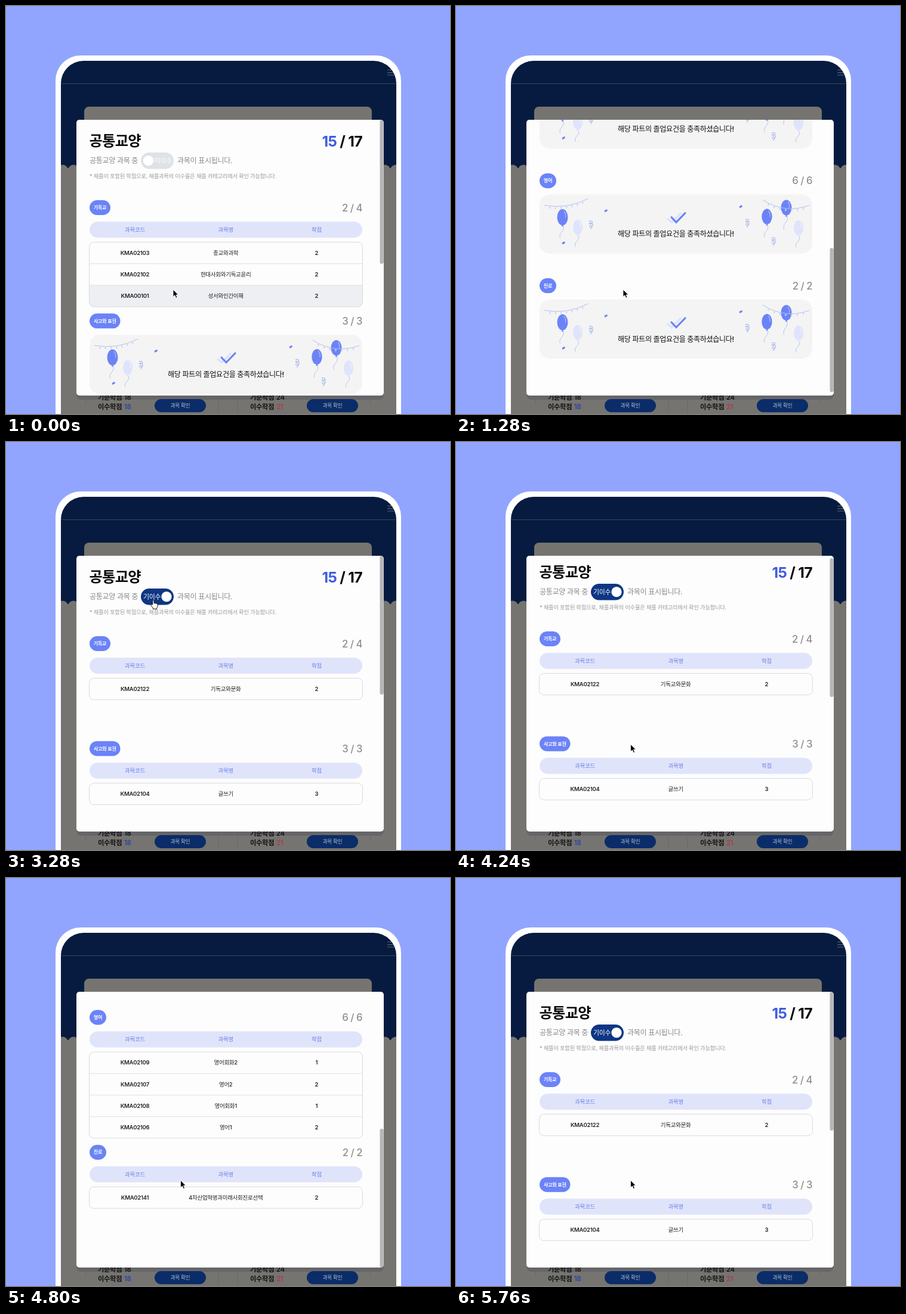
Animation, 744 px wide and 685 px high, one loop 6.24 s. Source, as an HTML page:

```html
<!DOCTYPE html>
<html lang="ko">
<head>
<meta charset="utf-8">
<title>공통교양</title>
<style>
html, body { margin: 0; width: 100%; height: 100%; overflow: hidden; background: #91a5ff; }
svg { display: block; }
text { font-family: Inter, "Noto Sans CJK KR", "Noto Sans CJK", sans-serif; letter-spacing: -.03em; white-space: pre; }
</style>
</head>
<body>
<svg id="stage" width="744" height="685" viewBox="0 0 744 685"></svg>
<script>
const LOOP = 6240, TOP = 191, VIEW = 463;
const BLUE = '#6b83f7', PALE = '#dfe4fc', LINE = '#b3bfee', NAVY = '#0d3684';

const rect = (x, y, w, h, r, fill, extra = '') =>
  `<rect x="${x}" y="${y}" width="${w}" height="${h}" rx="${r}" fill="${fill}" ${extra}/>`;
const circle = (x, y, r, fill) => `<circle cx="${x}" cy="${y}" r="${r}" fill="${fill}"/>`;
const path = (d, stroke, width = 1, extra = '') =>
  `<path d="${d}" fill="none" stroke="${stroke}" stroke-width="${width}" ${extra}/>`;
// Places text by the vertical middle of its glyphs.
const text = (s, x, cy, size, fill, weight = 500, anchor = 'start') =>
  `<text x="${x}" y="${cy + size * .36}" font-size="${size}" fill="${fill}" font-weight="${weight}" text-anchor="${anchor}">${s}</text>`;

// ---- page behind the dialog ----
function summary(x, needed, done, color) {
  return text('기준학점', x, 657, 11.3, '#111', 600) + text(needed, x + 44, 657, 11.3, '#111', 600) +
    text('이수학점', x, 673, 11.3, '#111', 600) + text(done, x + 44, 673, 11.3, color, 600) +
    rect(x + 95, 660, 86, 22, 11, '#0a2c68') +
    text('과목 확인', x + 138, 671, 8.6, '#b9c0ce', 500, 'middle');
}
function backdrop() {
  let s = rect(83, 83, 579, 700, 42, '#fff') + '<g clip-path="url(#screen)">' +
    rect(92, 92, 562, 600, 0, '#061b3f') + path('M92 130.5H654', '#3b465b');
  for (const y of [107.5, 111.8, 116]) s += path(`M639 ${y}H654`, '#5c6577', 1.2);
  s += rect(92, 272, 562, 420, 0, '#757470');
  for (let x = 95; x < 664; x += 18) s += circle(x, 275.5, 9, '#757470');
  s += rect(131, 169, 482, 120, 8, '#757470') +
    path('M133.5 650V669M356 650V685M388 650V685M610.5 650V669', '#686868') +
    rect(118, 600, 515, 61, 8, '#666669') +
    summary(154, 18, 18, '#2747a8') + summary(409, 24, 21, '#b03a4a');
  return s + '</g>';
}

// ---- celebration card ----
const balloon = (x, y, rx, ry, fill, drop) =>
  path(`M${x} ${y + ry}q4 ${drop * .25} -1 ${drop * .5}t-3 ${drop * .5}`, LINE, .9) +
  `<path d="M${x - 2} ${y + ry + 2}l2 -3 2 3z" fill="${fill}"/>` +
  `<ellipse cx="${x}" cy="${y}" rx="${rx}" ry="${ry}" fill="${fill}"/>` +
  path(`M${x + rx * .3} ${y - ry * .72}q${rx * .4} ${ry * .3} ${rx * .25} ${ry * .75}`, '#fff', 1.1, 'opacity=".5" stroke-linecap="round"');
const confetti = (x, y) => `<path d="M${x - 2.5} ${y}l4.5 -2.5 1 3 -4.5 2.5z" fill="${BLUE}"/>`;
const curl = (x, y) =>
  path(`M${x - 3} ${y - 6}c8 -3 7 5 1 4c-4 -2 7 -3 5 3c-1 4 -7 3 -5 0c3 -3 6 3 1 6`, '#92a6ef', 1);
function garland(x0, y0, cx, cy, x1, y1) {
  let s = path(`M${x0} ${y0}Q${cx} ${cy} ${x1} ${y1}`, LINE, 1);
  for (let i = 1; i < 8; i++) {
    const t = i / 8, u = 1 - t;
    const x = u * u * x0 + 2 * u * t * cx + t * t * x1, y = u * u * y0 + 2 * u * t * cy + t * t * y1;
    s += `<ellipse cx="${x}" cy="${y + 2.6}" rx="1.2" ry="2" fill="#cbd4fa"/>`;
  }
  return s;
}
function card(y) {
  return `<g transform="translate(140 ${y})">` + rect(0, 0, 457, 99, 17, '#f4f4f4') +
    balloon(38.5, 38, 9, 13.5, BLUE, 22) + balloon(64, 55, 8, 12.5, PALE, 20) +
    garland(8, 18, 46, 25, 81, 7) + confetti(111, 27) + confetti(40, 81) + curl(86, 51) +
    path('M214 40L221.5 46.5 237 31', '#dbe2fd', 3.2) +
    path('M221 38L229 46.5 244 31', BLUE, 3.2, 'stroke-linecap="round"') +
    text('해당 파트의 졸업요건을 충족하셨습니다!', 228.5, 66.5, 12.1, '#111', 500, 'middle') +
    confetti(337, 20) + curl(348, 48) + balloon(381, 37, 8.7, 13, BLUE, 22) +
    balloon(413.5, 22, 9, 13, BLUE, 24) + balloon(434, 56, 8.2, 12.5, PALE, 20) +
    garland(374, 9, 412, 33, 452, 18) + curl(392, 79) + '</g>';
}

// ---- scrolling content ----
const rowAreas = [];
const heading = (name, width, y, count) =>
  rect(140, y - 12.5, width, 25, 12.5, BLUE) + text(name, 140 + width / 2, y, 8.1, '#fff', 700, 'middle') +
  text(count, 597, y, 16.8, '#8f8f8f', 500, 'end');
const columns = (cells, y, fill, weight) =>
  cells.map((c, i) => text(c, 216 + i * 152.2, y, 9.5, fill, i === 1 ? 500 : weight, 'middle')).join('');
function table(y, rows) {
  const h = 36.2, top = y + 58;
  let s = rect(140, y + 23.5, 457, 27, 13.5, '#e0e4fb') +
    columns(['과목코드', '과목명', '학점'], y + 37, '#6c82e4', 500);
  rows.forEach((cells, i) => {
    const ry = top + i * h, first = i === 0, last = i === rows.length - 1;
    const a = first ? 8 : 0, b = last ? 8 : 0;
    s += `<path data-row="${ry}" d="M140 ${ry + a}q0 ${-a} ${a} ${-a}H${597 - a}q${a} 0 ${a} ${a}V${ry + h - b}q0 ${b} ${-b} ${b}H${140 + b}q${-b} 0 ${-b} ${-b}z" fill="#fdfdfd"/>`;
    if (!first) s += path(`M140 ${ry}H597`, '#dfe0e4');
    s += columns(cells, ry + 18, '#222', 600);
  });
  return s + rect(139.5, top, 458, rows.length * h, 8, 'none', 'stroke="#d9dade"');
}
const intro =
  text('공통교양', 139.5, 226.5, 24.3, '#0b0b0b', 700) +
  `<text x="597" y="235.5" font-size="24.8" font-weight="700" text-anchor="end" fill="#0b0b0b"><tspan fill="#3f5be3">15</tspan> / 17</text>` +
  text('공통교양 과목 중', 140, 259.5, 12.1, '#8a8a8a') + text('과목이 표시됩니다.', 287, 259.5, 12.1, '#8a8a8a') +
  text('* 채플이 포함된 학점으로, 채플과목의 이수율은 채플 카테고리에서 확인 가능합니다.', 140, 286, 9.35, '#9b9b9b', 400);

const pending = heading('기독교', 35, 338.5, '2 / 4') + table(338.5, [
    ['KMA02103', '종교와과학', 2], ['KMA02102', '현대사회와기독교윤리', 2], ['KMA00101', '성서와인간이해', 2]]) +
  heading('사고와 표현', 51.5, 528.8, '3 / 3') + card(552) +
  heading('영어', 28, 705.2, '6 / 6') + card(728.4) +
  heading('진로', 28, 881.4, '2 / 2') + card(904.8);

const finished = heading('기독교', 35, 338.5, '2 / 4') + table(338.5, [['KMA02122', '기독교와문화', 2]]) +
  heading('사고와 표현', 51.5, 514.7, '3 / 3') + table(514.7, [['KMA02104', '글쓰기', 3]]) +
  heading('영어', 28, 691, '6 / 6') + table(691, [
    ['KMA02109', '영어회화2', 1], ['KMA02107', '영어2', 2], ['KMA02108', '영어회화1', 1], ['KMA02106', '영어1', 2]]) +
  heading('진로', 28, 917.5, '2 / 2') + table(917.5, [['KMA02141', '4차산업혁명과미래사회진로선택', 2]]);

const toggle = rect(226, 246, 55, 27.5, 13.75, '#dfe1e8', 'id="track"') +
  `<g id="offLabel">${text('미이수', 249, 259.7, 10.9, '#fff')}</g>` +
  `<g id="onLabel">${text('기이수', 230, 259.7, 10.9, '#fff')}</g>` +
  '<circle id="knob" cy="259.7" r="8.6" fill="#fff"/>';

const arrow = '<path id="arrow" d="M0 0V12.3L2.9 9.7 4.9 14.2 7 13.2 5 8.9H8.8z" fill="#000" stroke="#fff" stroke-width=".9"/>';
const hand = '<path id="hand" d="M-1.3 7V.8q0-1.3 1.2-1.3t1.2 1.3V4.6q1.2-.8 2 .3 1.3-.7 2 .5 2-.4 2 1.5V9.5q0 2-1.5 3.2V14.2H-.6V12.8L-4.2 8.3q-.4-1.6 1.1-1.6z" fill="#fff" stroke="#111" stroke-width="1"/>';

stage.innerHTML = `<defs>
  <clipPath id="screen">${rect(92, 92, 562, 700, 38, '#000')}</clipPath>
  <clipPath id="dialog">${rect(118, TOP, 515, VIEW, 5, '#000')}</clipPath></defs>` +
  rect(0, 0, 744, 685, 0, '#91a5ff') + backdrop() +
  '<g clip-path="url(#dialog)">' + rect(118, TOP, 515, VIEW, 0, '#fdfdfd') +
  `<g id="content">${intro}${toggle}<g id="pending">${pending}</g><g id="finished">${finished}</g></g>` +
  rect(626.5, TOP, 6.2, 242, 3.1, '#b6b6b8', 'id="thumb"') + '</g>' +
  `<g id="cursor">${arrow}${hand}</g>`;

// ---- timelines: [time, values...], each held until the next ----
const run = (start, values) => values.map((v, i) => [start + i * 80].concat(v));
const scrolls = [[0, 0],
  ...run(160, [10, 45, 110, 180, 235, 280, 315, 338, 352, 360, 363]),
  ...run(1120, [373, 395, 411.8, 419, 422]), [1600, 423],
  ...run(1920, [350, 200]), ...run(2160, [85, 20, 0]),
  ...run(4240, [8, 50, 130, 220.5, 310, 390, 440, 457]),
  ...run(5360, [430, 330, 200, 90, 20, 0])];
const pointer = [[0, 280, 476],
  ...run(2480, [[279, 468], [274, 436], [266, 376], [256, 310], [249, 278], [247, 266]]),
  ...run(3600, [[258, 330], [282, 455], [292.5, 507.5]])];
const switching = [[0, 0], ...run(3120, [.35, .8, 1])];
const at = (keys, t) => keys.findLast(k => k[0] <= t).slice(1);

const el = id => document.getElementById(id);
const set = (id, attrs) => { for (const k in attrs) el(id).setAttribute(k, attrs[k]); };
const show = (id, on) => el(id).setAttribute('display', on ? 'inline' : 'none');
const rows = [...document.querySelectorAll('[data-row]')];

function draw(t) {
  const [scroll] = at(scrolls, t), [x, y] = at(pointer, t), [on] = at(switching, t);
  const height = on ? 920 : 886, ratio = VIEW / height;
  set('content', { transform: `translate(0 ${-scroll})` });
  set('thumb', { y: TOP + scroll * ratio, height: VIEW * ratio });
  set('cursor', { transform: `translate(${x} ${y})` });
  set('knob', { cx: 238.5 + 30.5 * on });
  set('track', { fill: on ? NAVY : '#dfe1e8' });
  show('pending', !on);
  show('finished', on);
  show('offLabel', !on);
  show('onLabel', on);
  const overToggle = scroll === 0 && x > 226 && x < 281 && y > 246 && y < 273;
  show('hand', overToggle);
  show('arrow', !overToggle);
  for (const row of rows) {
    const offset = y + scroll - row.dataset.row;
    row.setAttribute('fill', offset >= 0 && offset < 36.2 ? '#eeeff3' : '#fdfdfd');
  }
}
const start = performance.now();
function tick() {
  draw((performance.now() - start) % LOOP);
  requestAnimationFrame(tick);
}
tick();
</script>
</body>
</html>
```
